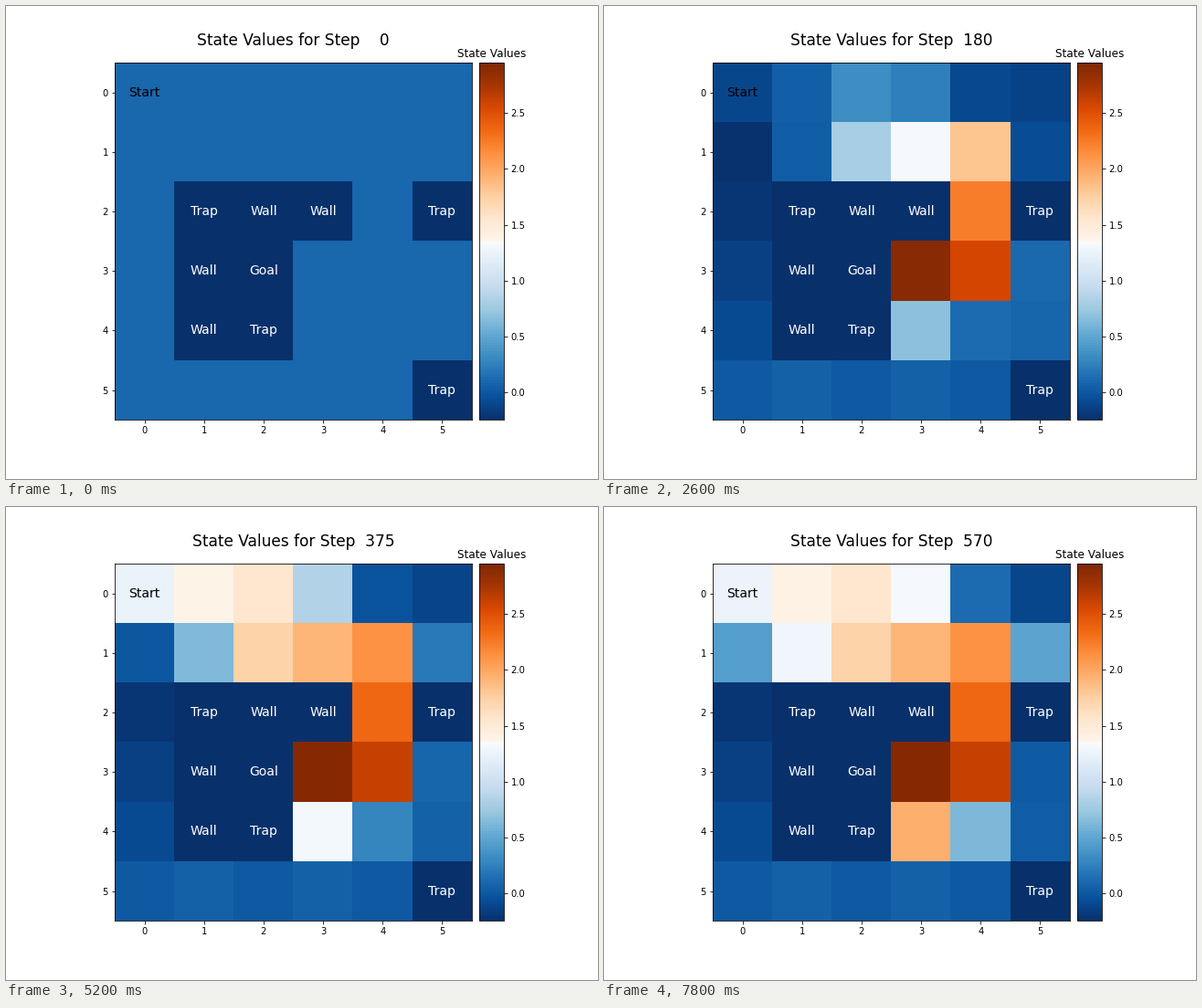
A matplotlib script for the animation above (8000 ms loop, 648 by 518 pixels).

```python
import numpy as np
import matplotlib.pyplot as plt
from matplotlib.animation import FuncAnimation
from matplotlib.colors import ListedColormap

W, H, DPI = 648, 518, 72
SIZE = 391
LEFT, BOTTOM, BAR_LEFT = 118.95, 64.8, 518.02
VMIN, VMAX = -0.246, 2.95
FRAMES, INTERVAL, STEP = 40, 200, 15

START = 0.1          # value of every free cell before learning
WORN = -0.22         # value of a path cell before the reward arrives
BEST, DISCOUNT = 2.91, 0.9
SETTLE, LAST = 105, 570

LABELS = {
    "Start": [(0, 0)],
    "Goal": [(3, 2)],
    "Trap": [(2, 1), (2, 5), (4, 2), (5, 5)],
    "Wall": [(2, 2), (2, 3), (3, 1), (4, 1)],
}

# The best route, from the goal back to the start.
ROUTE = [(3, 3), (3, 4), (2, 4), (1, 4), (1, 3), (1, 2), (0, 2), (0, 1), (0, 0)]

# Cells beside the route: settled value, last value, easing power.
SIDE = {
    (0, 3): (-.13, 1.33, .75), (1, 1): (-.16, 1.29, 1.1),
    (4, 3): (.44, 1.95, 1), (4, 4): (.11, .62, 2),
    (1, 0): (-.24, .45, 2), (1, 5): (-.17, .48, 1),
    (0, 4): (-.10, .12, 2), (0, 5): (-.13, -.10, 1),
    (3, 5): (.11, .02, 2), (4, 5): (.09, .03, 1),
}


def sigmoid(z):
    return 1 / (1 + np.exp(-z))


def settle(end, step):
    return START + (end - START) * min(1, step / SETTLE)


def route_value(dist, step):
    """The reward spreads back along the route, discounted at each cell."""
    arrival = 40 + 38 * dist ** .8
    first = sigmoid(-arrival / 25)
    gain = (sigmoid((step - arrival) / 25) - first) / (1 - first)
    low = settle(WORN, step)
    return low + (BEST * DISCOUNT ** dist - low) * gain


def side_value(low, end, power, step):
    u = max(0, step - SETTLE) / (LAST - SETTLE)
    return settle(low, step) + (end - low) * u ** power


def grid(step):
    cells = np.full((6, 6), VMIN)
    for row in range(2, 5):
        cells[row, 0] = settle(-.2 + .06 * (row - 2), step)
    for col in range(5):
        cells[5, col] = settle(.015 + .05 * (col % 2), step)
    for cell, curve in SIDE.items():
        cells[cell] = side_value(*curve, step)
    for dist, cell in enumerate(ROUTE):
        cells[cell] = route_value(dist, step)
    return cells


def px_axes(x, y, w, h):
    return fig.add_axes([x / W, y / H, w / W, h / H])


plt.rcParams["font.family"] = "DejaVu Sans"
ramp = np.linspace(0, 1, 128)
cmap = ListedColormap(np.vstack([plt.cm.Blues_r(ramp), plt.cm.Oranges(ramp)]))

fig = plt.figure(figsize=(W / DPI, H / DPI), dpi=DPI, facecolor="white")
ax = px_axes(LEFT, BOTTOM, SIZE, SIZE)
cax = px_axes(BAR_LEFT, BOTTOM, .07 * SIZE, SIZE)

image = ax.imshow(grid(0), cmap=cmap, vmin=VMIN, vmax=VMAX,
                  interpolation="nearest", aspect="auto")
for word, places in LABELS.items():
    for row, col in places:
        ax.text(col, row, word, ha="center", va="center", fontsize=14,
                color="black" if word == "Start" else "white")
title = ax.set_title("", fontsize=17, pad=18.8)

fig.colorbar(image, cax=cax)
cax.set_title("State Values", fontsize=12)


def update(frame):
    step = STEP * max(0, frame - 1)
    image.set_data(grid(step))
    title.set_text(f"State Values for Step {step:4d}")
    return image, title


anim = FuncAnimation(fig, update, frames=FRAMES, interval=INTERVAL,
                     init_func=lambda: update(0), repeat=True, repeat_delay=0)
plt.show()
```
